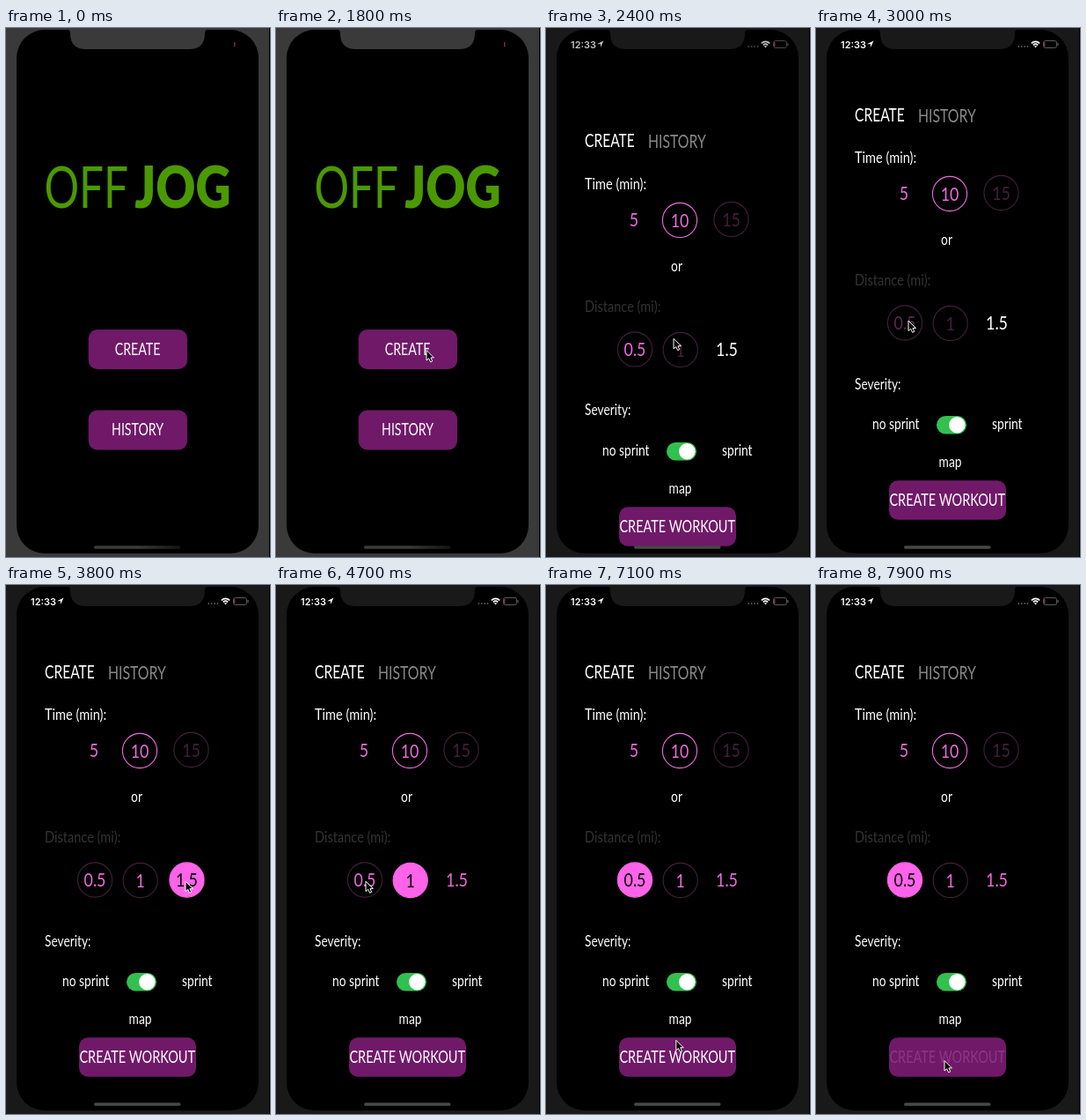
An HTML page that plays this animation: 300x600 px, repeating every 8 s.

```html
<!DOCTYPE html>
<html lang="en">
<head>
<meta charset="utf-8">
<title>Workout app</title>
<style>
  html, body { margin: 0; width: 100%; height: 100%; overflow: hidden; background: #000; }
  svg { display: block; width: 300px; height: 600px; }
  text { font-family: Lato, "Open Sans", sans-serif; }
  .clock { font: 600 11px Inter, Roboto, sans-serif; }
</style>
</head>
<body>
<svg id="stage" viewBox="0 0 300 600" xmlns="http://www.w3.org/2000/svg"></svg>
<script>
const LOOP = 8000, STEP = 100;
const PINK = '#ee6bdc', HOT = '#ff63e9', DIM = '#431f3b', PURPLE = '#701969', GREEN = '#4b9902';
const CAPS = 0.725, MIXED = 0.81; // condensed proportions for capitals and for mixed text
const stage = document.getElementById('stage');

function add(parent, tag, attrs = {}, content = '') {
  const node = document.createElementNS(stage.namespaceURI, tag);
  set(node, attrs);
  node.textContent = content;
  return parent.appendChild(node);
}

function set(node, attrs) {
  for (const name in attrs) node.setAttribute(name, attrs[name]);
}

function label(parent, content, x, y, size, { fill = '#fff', anchor = 'start', width = MIXED, weight = 400 } = {}) {
  return add(parent, 'text', {
    transform: `translate(${x} ${y}) scale(${width} 1)`,
    'font-size': size, 'font-weight': weight, 'text-anchor': anchor, fill
  }, content);
}

function button(parent, content, x, y, w, h, size) {
  add(parent, 'rect', { x, y, width: w, height: h, rx: 10, fill: PURPLE });
  return label(parent, content, x + w / 2 - 0.3, y + 28.7, size, { anchor: 'middle', width: CAPS });
}

function choice(parent, content, x, y, ring, fill = PINK) {
  const disc = add(parent, 'circle', { cx: x, cy: y, r: 19.6, fill: 'none', stroke: ring, 'stroke-width': 1.1 });
  const text = label(parent, content, x, y + 7.7, 22, { fill, anchor: 'middle' });
  return { disc, text, ring };
}

// Home screen
add(stage, 'rect', { width: 300, height: 600 });
const home = add(stage, 'g');
label(home, 'OFF', 43.5, 203.5, 66, { fill: GREEN, width: 0.75 });
label(home, 'JOG', 255.5, 203.5, 66, { fill: GREEN, width: 0.84, weight: 900, anchor: 'end' });
const createLabel = button(home, 'CREATE', 93.7, 342, 112.3, 45, 19.5);
button(home, 'HISTORY', 93.7, 433.5, 112.3, 45, 19.5);

// Workout sheet
const sheet = add(stage, 'g');
add(sheet, 'rect', { x: 0, y: 38.3, width: 300, height: 600, rx: 8 });
label(sheet, 'CREATE', 44, 105.5, 21.5, { width: CAPS });
label(sheet, 'HISTORY', 116, 106.5, 21.8, { fill: '#888', width: CAPS });
label(sheet, 'Time (min):', 44, 153, 18);
choice(sheet, '5', 100, 187.5, 'none');
choice(sheet, '10', 152, 188, PINK);
choice(sheet, '15', 210.5, 187, DIM, DIM);
label(sheet, 'or', 148.5, 246, 17, { anchor: 'middle' });
label(sheet, 'Distance (mi):', 44, 292, 18, { fill: '#333' });
const distances = [
  choice(sheet, '0.5', 101, 334.5, DIM),
  choice(sheet, '1', 152.7, 335, DIM),
  choice(sheet, '1.5', 205.5, 334.5, 'none')
];
label(sheet, 'Severity:', 44, 409.5, 17);
label(sheet, 'no sprint', 64, 455, 17);
add(sheet, 'rect', { x: 137, y: 440, width: 34, height: 20.6, rx: 10.3, fill: '#32c04f' });
add(sheet, 'circle', { cx: 160.3, cy: 450.3, r: 9.2, fill: '#fff' });
label(sheet, 'sprint', 200, 455, 17);
label(sheet, 'map', 152.5, 498, 17, { anchor: 'middle' });
const workoutLabel = button(sheet, 'CREATE WORKOUT', 83, 513.3, 133, 44.5, 20);

// Phone body, with the screen and notch cut out
const body = add(stage, 'g');
const bezel = add(body, 'path', {
  'fill-rule': 'evenodd',
  d: `M0 0V600H299V0Z
      M44 2H70Q73 2 73 6Q73 24 91 24H208Q226 24 226 6Q226 2 229 2H255A32 32 0 0 1 287 34V564
      A32 32 0 0 1 255 596H44A32 32 0 0 1 12 564V34A32 32 0 0 1 44 2Z`
});
const fade = add(body, 'linearGradient', { id: 'fade' });
add(fade, 'stop', { offset: 0.5, 'stop-color': '#3c3c3c' });
add(fade, 'stop', { offset: 1, 'stop-color': '#141414' });
const indicator = add(body, 'rect', { x: 100, y: 587.3, width: 98.5, height: 3.4, rx: 1.7 });

// Status bar
const status = add(stage, 'g');
add(status, 'text', { x: 28, y: 22.5, class: 'clock', fill: '#fff' }, '12:33');
add(status, 'path', { d: 'M65.5 14.5L62 22V18.2H58Z', fill: '#fff' });
for (let i = 0; i < 4; i++) add(status, 'circle', { cx: 230.3 + i * 3.4, cy: 21, r: 1, fill: '#555' });
add(status, 'path', { d: 'M244.8 17.4Q249.5 13.2 254.2 17.4M246.8 19.4Q249.5 17 252.2 19.4', fill: 'none', stroke: '#fff', 'stroke-width': 1.6 });
add(status, 'path', { d: 'M247.9 20.6Q249.5 19.4 251.1 20.6L249.5 22.4Z', fill: '#fff' });
add(status, 'rect', { x: 258.5, y: 14.5, width: 15, height: 8, rx: 2.2, fill: 'none', stroke: '#666', 'stroke-width': 0.9 });
add(status, 'path', { d: 'M275 17v3', stroke: '#666' });
add(stage, 'rect', { x: 259.3, y: 16, width: 1, height: 5.2, fill: '#b5483f' });

const cursor = add(stage, 'path', {
  d: 'M0 0V11.5L2.7 9.2L4.6 13.3L6.7 12.3L4.9 8.4H8.4Z',
  fill: '#000', stroke: '#fff', 'stroke-width': 1, 'stroke-linejoin': 'round'
});

// Pointer stops: time, x, y
const stops = [
  [100, 298, 512], [1000, 224, 436], [1500, 171, 365.5], [2100, 171, 365.5],
  [2800, 105, 332], [3100, 105, 332], [3600, 204, 336], [3800, 204, 336],
  [4100, 152, 336], [4300, 152, 336], [4600, 102, 336], [5100, 102, 336],
  [5900, 153, 450], [6500, 153, 450], [7400, 146, 539.5], [LOOP, 146, 539.5]
];

const clamp = v => Math.max(0, Math.min(1, v));
const mix = (a, b, p) => a + (b - a) * p;
const within = (t, from, to) => t >= from && t < to;

function pointerAt(t) {
  const i = Math.max(1, stops.findIndex(s => s[0] >= t));
  const [t0, x0, y0] = stops[i - 1], [t1, x1, y1] = stops[i];
  const u = clamp((t - t0) / (t1 - t0));
  const p = i === 1 ? u : u * u * (3 - 2 * u);
  return [mix(x0, x1, p), mix(y0, y1, p)];
}

// Critically damped spring
function risen(t) {
  const s = Math.max(0, t - 1950) * 0.01037;
  return t >= 2700 ? 1 : 1 - (1 + s) * Math.exp(-s);
}

function selectedAt(t) {
  if (t < 3100) return -1;
  if (t < 3800) return 0;
  if (t < 4300) return 2;
  return t < 4900 ? 1 : 0;
}

function draw(t) {
  const p = risen(t);
  const scale = 1 - 0.104 * p;
  set(home, { transform: `translate(150 300) scale(${scale}) translate(-150 -300)`, opacity: 1 - 0.12 * p });
  set(sheet, { transform: `translate(0 ${562 * (1 - p)})` });
  set(createLabel, { opacity: within(t, 1900, 2000) ? 0.3 : 1 });

  const shade = Math.round(mix(58, 25, clamp((t - 1900) / 200)));
  set(bezel, { fill: `rgb(${shade},${shade},${shade + (t > 1900 ? 1 : 0)})` });
  set(indicator, { fill: t < 1900 ? 'url(#fade)' : '#484848' });
  set(status, { opacity: t < 1950 ? 0 : mix(0.08, 1, clamp((t - 2100) / 400)) });

  const selected = selectedAt(t);
  distances.forEach(({ disc, text, ring }, i) => {
    const on = i === selected;
    let fill = on ? '#000' : PINK;
    if (i === 2 && t < 3800) fill = '#fff';
    if (i === 1 && t < 3100) fill = DIM;
    if (i === 0 && (within(t, 2900, 3100) || within(t, 4800, 4900))) fill = '#5a2850';
    set(disc, { fill: on ? HOT : 'none', stroke: on ? HOT : ring });
    set(text, { fill });
  });
  set(workoutLabel, { fill: t >= 7700 ? '#a04f9a' : '#fff', opacity: t >= 7700 ? 0.55 : 1 });

  const [x, y] = pointerAt(t);
  set(cursor, { transform: `translate(${x} ${y})`, opacity: t < 100 ? 0 : 1 });
}

const start = performance.now();
function tick() {
  const t = (performance.now() - start) % LOOP;
  draw(Math.floor(t / STEP) * STEP);
  requestAnimationFrame(tick);
}
tick();
</script>
</body>
</html>
```
